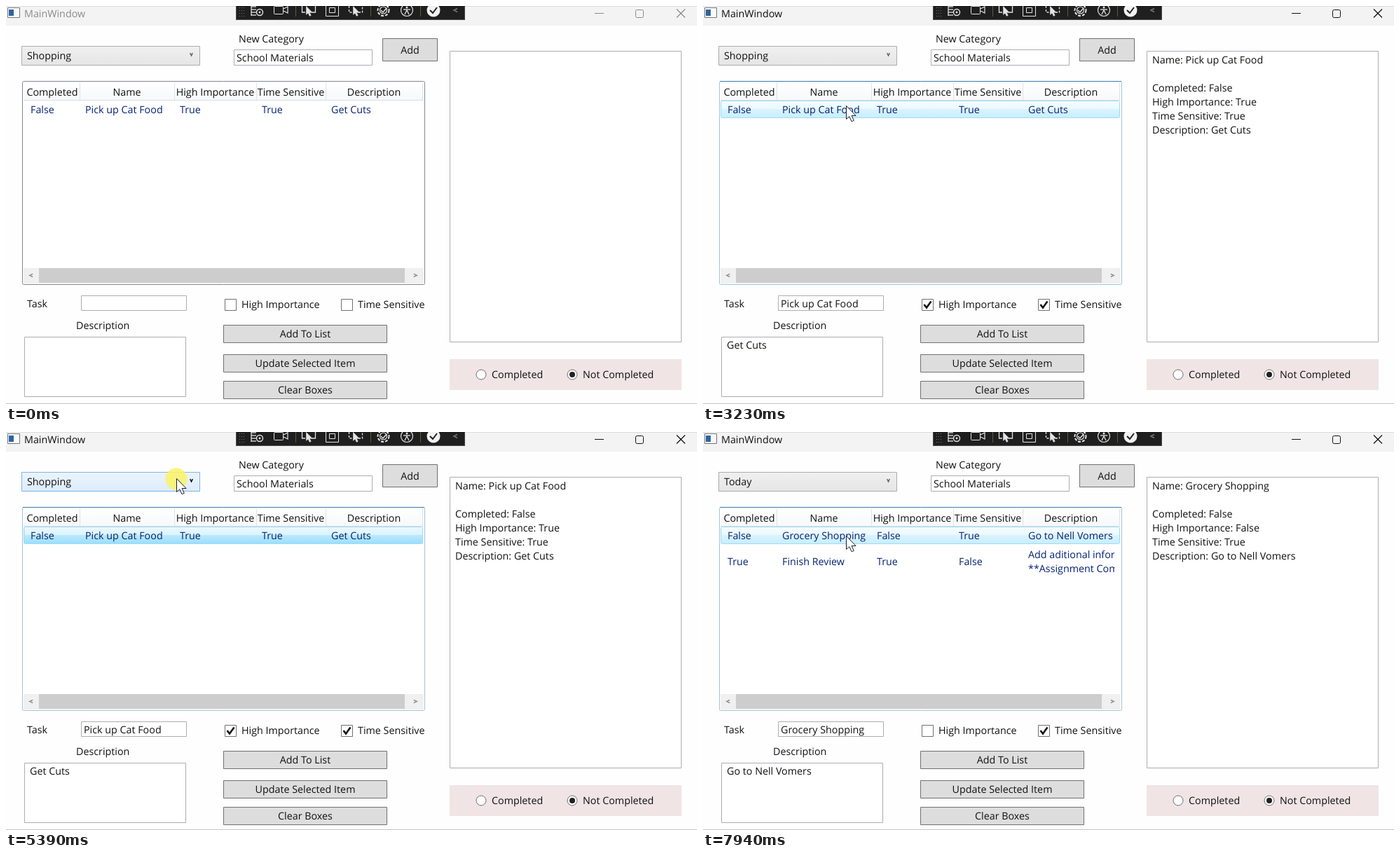
Animation, 986 px wide and 568 px high, one loop 8 s. Source, as an HTML page with a canvas:

```html
<!DOCTYPE html>
<html lang="en">
<head>
<meta charset="utf-8">
<title>Task list</title>
<style>
  html, body { margin: 0; width: 100%; height: 100%; overflow: hidden; background: #fff; }
  canvas { display: block; }
</style>
</head>
<body>
<canvas id="stage" width="986" height="568"></canvas>
<script>
const ctx = document.getElementById('stage').getContext('2d');
const LOOP = 8000, STEP = 77, CLICK = 110;
const INK = '#111', NAVY = '#042271', EDGE = '#abadb3';

// Each leg sets off from the end of the one before and bows sideways by `bend`.
const ENTRY = { x: 830, y: 575 };
const LEGS = [
  { start: 620, end: 1390, x: 204, y: 153, bend: -70 },
  { start: 1450, end: 1540, x: 201, y: 140 },
  { start: 3230, end: 3230, x: 204, y: 142 },
  { start: 3770, end: 4540, x: 330, y: 234, bend: 22 },
  { start: 4700, end: 5390, x: 243, y: 66 },
  { start: 5550, end: 5780, x: 207, y: 102 },
  { start: 5930, end: 6570, x: 204, y: 145 },
  { start: 7940, end: 7940, x: 204, y: 148 }
];
const PRESS = { row: 2080, combo: 5390, item: 5930, grocery: 7120 };
const POPUP_OPENS = 5550, POPUP_CLOSES = 6020;

const HEADERS = ['Completed', 'Name', 'High Importance', 'Time Sensitive', 'Description'];
const COLUMN_EDGES = [27, 105, 240, 357, 456, 594];
const CATEGORIES = ['Today', 'Shopping', 'Travel', 'School Materials'];

const CAT_FOOD = { done: 'False', name: 'Pick up Cat Food', high: 'True', timed: 'True', about: ['Get Cuts'] };
const GROCERY = { done: 'False', name: 'Grocery Shopping', high: 'False', timed: 'True', about: ['Go to Nell Vomers'] };
const REVIEW = { done: 'True', name: 'Finish Review', high: 'True', timed: 'False',
  about: ['Add aditional information', '**Assignment Complete'] };

function pointerAt(t) {
  const i = LEGS.findLastIndex(leg => t >= leg.start);
  if (i < 0) return null;
  const to = LEGS[i], from = LEGS[i - 1] || ENTRY;
  const steps = Math.round((to.end - to.start) / STEP) + 1;
  const p = Math.min(1, (Math.floor((t - to.start) / STEP + 0.2) + 1) / steps);
  const u = 1 - (1 - p) ** 1.15;
  const dx = to.x - from.x, dy = to.y - from.y;
  const bow = (to.bend || 0) * Math.sin(Math.PI * u) / Math.hypot(dx, dy);
  return { x: Math.round(from.x + dx * u + dy * bow), y: Math.round(from.y + dy * u - dx * bow) };
}

function text(str, x, y, color = INK, align = 'left') {
  ctx.fillStyle = color;
  ctx.textAlign = align;
  ctx.fillText(str, x, y + 5);
}

function fill(x, y, w, h, color) {
  ctx.fillStyle = color;
  ctx.fillRect(x, y, w, h);
}

function box(x, y, w, h, color, border = EDGE, radius = 0) {
  ctx.beginPath();
  ctx.roundRect(x + 0.5, y + 0.5, w - 1, h - 1, radius);
  ctx.fillStyle = color;
  ctx.fill();
  ctx.strokeStyle = border;
  ctx.lineWidth = 1;
  ctx.stroke();
}

function line(color, width, ...coords) {
  ctx.beginPath();
  for (let i = 0; i < coords.length; i += 2) ctx.lineTo(coords[i], coords[i + 1]);
  ctx.strokeStyle = color;
  ctx.lineWidth = width;
  ctx.stroke();
}

function chevron(x, y, dx, dy, color) {
  line(color, 1.5, x - dx - dy, y - dy - dx, x + dx, y + dy, x - dx + dy, y - dy + dx);
}

function circle(x, y, r, color, border, width = 1) {
  ctx.beginPath();
  ctx.arc(x, y, r, 0, Math.PI * 2);
  if (color) { ctx.fillStyle = color; ctx.fill(); }
  if (border) { ctx.strokeStyle = border; ctx.lineWidth = width; ctx.stroke(); }
}

function fade(y, h, top, bottom) {
  const g = ctx.createLinearGradient(0, y, 0, y + h);
  g.addColorStop(0, top);
  g.addColorStop(1, bottom);
  return g;
}

const ARROW = new Path2D('M0 0V19L4.3 15.2 7.6 22.3 10.8 20.9 7.6 14H13.6Z');

function arrow(x, y, color, border, scale = 1) {
  ctx.save();
  ctx.translate(x + 0.5, y + 0.5);
  ctx.scale(scale, scale);
  ctx.fillStyle = color;
  ctx.fill(ARROW);
  ctx.strokeStyle = border;
  ctx.lineWidth = 1;
  ctx.stroke(ARROW);
  ctx.restore();
}

function titleBar(active) {
  const color = active ? '#111' : '#8b8b8b';
  fill(0, 0, 986, 28, '#f3f3f3');
  fill(0, 0, 986, 1, '#dcdcdc');
  box(2, 2, 18, 15, '#fafafa', '#777');
  fill(4, 5, 7, 9, '#2d659f');
  text('MainWindow', 26, 11, color);
  line(color, 1, 840, 10.5, 853, 10.5);
  box(898, 5, 12, 12, 'transparent', color, 2);
  line(color, 1.2, 957, 4.5, 969, 16.5);
  line(color, 1.2, 969, 4.5, 957, 16.5);
}

function toolbar() {
  const pale = '#e4e4e4', dark = '#1f1f1f';
  fill(328, 0, 327, 20, '#4a4a4a');
  fill(329, 0, 325, 19, dark);
  for (let i = 0; i < 12; i++) fill(333 + i % 3 * 3, 2 + (i / 3 | 0) * 4, 1, 1, '#777');
  for (const x of [413, 520, 591]) fill(x, 0, 1, 15, '#5c5a45');

  for (const y of [1, 5, 9, 13]) line(pale, 1.3, 350, y, 357, y);
  line(pale, 1.3, 350, 0, 350, 14);
  circle(362, 9, 4.5, dark, pale, 1.4);
  circle(362, 9, 1.4, pale);

  box(382, 0, 14, 12, dark, pale, 1);
  line(pale, 1.2, 396, 4, 402, 1, 402, 10, 396, 7);

  for (const [x, dash] of [[432, []], [499, [3, 2]]]) {
    ctx.setLineDash(dash);
    line(pale, 1.3, x - 9.5, 0, x - 9.5, 9, x - 5, 9);
    line(pale, 1.3, x + 4, 9, x + 9.5, 9, x + 9.5, 0);
    ctx.setLineDash([]);
    arrow(x - 4, 0, pale, pale, 0.62);
  }
  box(456, -3, 19, 18, dark, pale);
  box(461, 2, 9, 8, dark, pale);

  ctx.setLineDash([4, 2]);
  circle(538.5, 6, 8, null, pale, 2);
  ctx.setLineDash([]);
  circle(538.5, 6, 5, null, pale, 1.2);
  line(pale, 1.5, 535, 6, 538, 9, 543, 3);
  circle(572, 6, 8.5, null, pale, 1.2);
  circle(572, 2, 1.5, pale);
  line(pale, 1.3, 567, 5, 577, 5);
  line(pale, 1.3, 569, 12, 572, 6, 575, 12);
  circle(610, 6, 9.5, '#f2f2f2');
  line(dark, 2, 605, 6, 609, 10, 615, 2);
  chevron(641.5, 6, -2.5, 0, '#777');
}

function button(label, x, y, w, h) {
  box(x, y, w, h, '#ddd', '#707070');
  text(label, x + w / 2, y + h / 2, INK, 'center');
}

function checkbox(label, x, checked) {
  box(x, 418, 17, 17, '#fff', '#707070');
  if (checked) line('#151515', 2.6, x + 3.5, 426, x + 7, 430.5, x + 13.5, 421.5);
  text(label, x + 24, 426);
}

function radio(label, x, checked) {
  circle(x, 526, 7, '#fff', '#707070');
  if (checked) circle(x, 526, 4, '#212121');
  text(label, x + 15, 526);
}

function combo(value, hover) {
  box(22, 57, 255, 28, hover ? fade(57, 28, '#ecf4fc', '#dcecfc') : fade(57, 28, '#f0f0f0', '#e5e5e5'),
    hover ? '#7eb4ea' : '#acacac');
  text(value, 30, 71);
  chevron(264.5, 69, 0, 1.8, hover ? '#000' : '#606060');
}

function rowBackground(look) {
  const [top, bottom, border] = {
    hover: ['#eaf9ff', '#c9edfd', null],
    selected: ['#d9f4ff', '#9bddfb', '#98ddfb'],
    both: ['#eaf9ff', '#c9edfd', '#98ddfb'],
    inactive: ['#eeeded', '#dddddd', '#cfcfcf']
  }[look];
  const paint = fade(135, 25, top, bottom);
  if (border) box(25, 135, 570, 25, paint, border, 2);
  else fill(25, 135, 570, 25, paint);
  fill(27, 136, 567, 11, 'rgba(255,255,255,.46)');
}

function row(task, y) {
  const cellX = column => COLUMN_EDGES[column] + 8;
  [task.done, task.name, task.high, task.timed].forEach((s, i) => text(s, cellX(i), y, NAVY));
  ctx.save();
  ctx.beginPath();
  ctx.rect(cellX(4), 136, 123.5, 100);
  ctx.clip();
  task.about.forEach((s, i) => text(s, cellX(4), y + (i - (task.about.length - 1) / 2) * 20, NAVY));
  ctx.restore();
}

function list(tasks, look, lit) {
  box(23, 107, 575, 291, '#fff', lit ? '#a0c4d8' : '#828790', 2);
  if (lit) line('#3d7bad', 1, 24, 107.5, 597, 107.5);
  fill(25, 109, 570, 25, fade(109, 25, '#fff', '#f7f8fa'));
  fill(25, 134, 570, 1, '#dcdde0');
  HEADERS.forEach((label, i) => {
    const [left, right] = COLUMN_EDGES.slice(i);
    fill(right, 110, 1, 24, '#e0e2e6');
    text(label, (left + right) / 2, 123, INK, 'center');
  });
  if (look) rowBackground(look);
  tasks.forEach((task, i) => row(task, 148 + i * 36.5));

  fill(25, 374, 571, 22, '#f0f0f0');
  fill(47, 374, 522, 21, '#cdcdcd');
  chevron(36, 384.5, -2.2, 0, '#8c8c8c');
  chevron(584, 384.5, 2.2, 0, '#8c8c8c');
}

function popup(pointerY) {
  fill(27, 89, 253, 101, 'rgba(0,0,0,.22)');
  fill(27, 89, 251, 99, 'rgba(0,0,0,.4)');
  box(23, 85, 254, 102, '#fff', '#646464');
  const hovered = Math.floor((pointerY - 86) / 25);
  CATEGORIES.forEach((name, i) => {
    const y = 86 + i * 25;
    if (i === hovered) box(24, y, 252, 25, '#b8dff3', '#26a0da');
    else if (name === 'Shopping') fill(24, y, 252, 25, '#f2f2f2');
    text(name, 30, y + 13);
  });
}

function details(task) {
  text(task.name, 111, 425);
  text(task.about[0], 34, 484);
  ['Name: ' + task.name, '', 'Completed: ' + task.done, 'High Importance: ' + task.high,
    'Time Sensitive: ' + task.timed, 'Description: ' + task.about[0]]
    .forEach((s, i) => text(s, 641, 77 + i * 20));
}

function draw(t) {
  const pointer = pointerAt(t);
  const between = (from, to) => t >= from && t < to;
  const over = (x, y, w, h) => pointer && pointer.x >= x && pointer.x < x + w && pointer.y >= y && pointer.y < y + h;
  const open = between(POPUP_OPENS, POPUP_CLOSES);
  const today = t >= POPUP_CLOSES;
  const shown = t >= PRESS.grocery ? GROCERY : t >= PRESS.row + STEP ? CAT_FOOD : null;
  const selected = today ? shown === GROCERY : shown;
  const focused = between(PRESS.row, POPUP_OPENS) || t >= PRESS.grocery;
  const overRow = !open && t >= LEGS[1].start && over(25, 135, 570, 25);
  const look = selected ? (open ? 'inactive' : overRow ? 'both' : 'selected') : overRow ? 'hover' : null;

  ctx.font = '14.3px "Open Sans", "Noto Sans", sans-serif';
  ctx.textRendering = 'geometricPrecision';
  fill(0, 0, 986, 568, '#fefefe');
  titleBar(t >= PRESS.row);
  toolbar();
  fill(0, 567, 986, 1, '#c4c4c4');

  combo(today ? 'Today' : 'Shopping', !open && over(22, 57, 255, 28));
  text('New Category', 332, 47);
  box(325, 62, 198, 23, '#fff');
  text('School Materials', 329, 74);
  button('Add', 537, 46, 79, 33);
  list(today ? [GROCERY, REVIEW] : [CAT_FOOD], look, focused || (!open && over(23, 107, 575, 291)));

  text('Task', 30, 425);
  box(107, 413, 151, 22, '#fff');
  text('Description', 100, 456);
  box(26, 472, 231, 86, '#fff');
  checkbox('High Importance', 312, shown?.high === 'True');
  checkbox('Time Sensitive', 478, shown?.timed === 'True');
  button('Add To List', 310, 455, 234, 26);
  button('Update Selected Item', 310, 497, 234, 26);
  button('Clear Boxes', 310, 535, 234, 26);

  box(633, 64, 331, 416, '#fff', over(633, 64, 331, 416) ? '#7eb4ea' : EDGE);
  fill(633, 504, 331, 44, '#f0e4e4');
  radio('Completed', 678, false);
  radio('Not Completed', 808, true);
  if (shown) details(shown);

  if (open) popup(pointer.y);
  if (!pointer) return;
  if (Object.values(PRESS).some(start => between(start, start + CLICK))) {
    circle(pointer.x, pointer.y + 1, 15.5, 'rgba(250,243,100,.85)');
  }
  arrow(pointer.x, pointer.y, '#fff', '#1c1c2c');
}

function tick() {
  draw(performance.now() % LOOP);
  requestAnimationFrame(tick);
}
tick();
</script>
</body>
</html>
```
